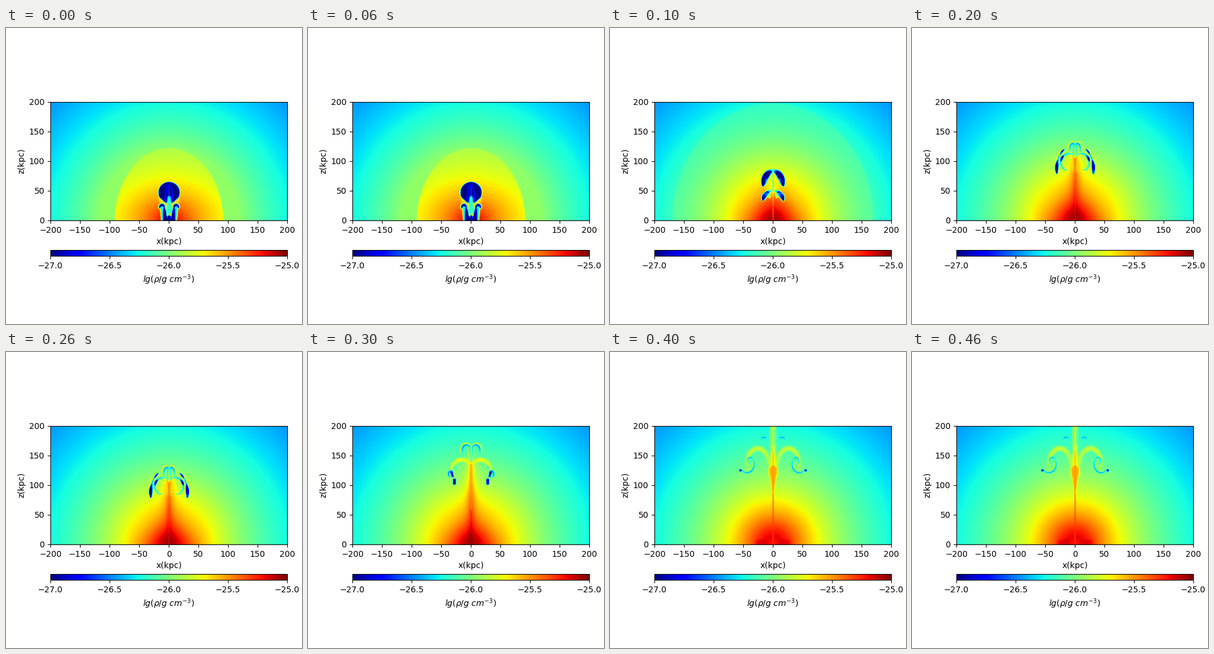
Animation of 500x500 px, one loop 0.5 s. Source, as a matplotlib script:

```python
import numpy as np
import matplotlib.pyplot as plt
from matplotlib.animation import FuncAnimation

LOW, HIGH = -27.0, -25.0
CYAN, BLUE, YELLOW = -26.25, -26.5, -25.73

# Right half of the domain; the left half is its mirror image.
x, z = np.meshgrid(np.arange(200) + 0.5, np.arange(200) + 0.5)
r = np.hypot(x, z)
t = np.linspace(0, 1, 70)


def beta_model(q, centre, slope, core):
    """Log density of gas falling off beyond a core radius."""
    return centre - slope * np.log10(1 + (q / core) ** 2)


def halo():
    return beta_model(r, -25.06, 0.67, 26)


def cool_flanks(f):
    """Thin the gas between the axis and the midplane."""
    f -= 0.07 * np.exp(-((r - 45) / 25) ** 2) * 2 * x * z / r ** 2


def plume(f, top, gain, width):
    """Lift dense gas along the axis up to a given height."""
    rise = np.clip(z / 80, 0, 1) * np.clip((top - z) / 25, 0, 1)
    f += gain * rise * np.exp(-x / width)


def stamp(f, level, px, pz, w, soft):
    """Blend a soft-edged trail of half-width w into the field."""
    gap = np.full(x.shape, 1e3)
    for a, b, half in zip(px, pz, w):
        np.minimum(gap, np.hypot(x - a, z - b) - half, out=gap)
    f += np.clip(0.5 - gap / soft, 0, 1) * (level - f)


def line(f, level, z0, z1, w0, w1=None, x0=0, x1=None, soft=2):
    w1 = w0 if w1 is None else w1
    x1 = x0 if x1 is None else x1
    stamp(f, level, x0 + (x1 - x0) * t, z0 + (z1 - z0) * t,
          w0 + (w1 - w0) * t, soft)


def curl(f, level, centre, radii, start, end, w, soft=2):
    """Elliptic arc between two angles, thinning towards its ends."""
    angle = np.radians(start + (end - start) * t)
    stamp(f, level, centre[0] + radii[0] * np.cos(angle),
          centre[1] + radii[1] * np.sin(angle),
          w * (0.4 + 0.6 * np.sin(np.pi * t)), soft)


def crown(f, centre, rx, rz, w):
    """Rolled-up cap: a thin arc inside a denser rim."""
    curl(f, YELLOW, centre, (rx + 3, rz + 3), 130, -20, w, soft=3)
    curl(f, BLUE, centre, (rx, rz), 130, -20, w)


def bubble():
    inner = beta_model(np.hypot(x, 1.3 * z), -25.12, 0.37, 15)
    outer = np.minimum(halo(), -25.95)
    f = np.where(np.hypot(x / 91, z / 122) < 1, inner, outer)
    line(f, LOW, 47, 47, 18)
    curl(f, -25.65, (0, 47), (20, 20), -65, -30, 3, soft=3)
    line(f, -26.15, 16, 38, 6, 3, soft=4)
    line(f, BLUE, 34, 60, 0.6, x0=7, x1=3)
    # feet and base column
    line(f, CYAN, 0, 24, 3, x0=10, x1=12, soft=3)
    curl(f, CYAN, (12, 21), (4, 5), 180, 0, 3, soft=3)
    curl(f, LOW, (12, 21), (4, 5), 180, 0, 1.8)
    line(f, LOW, 0, 19, 4, 1.8, x0=6, x1=8)
    line(f, LOW, 0, 6, 3)
    line(f, CYAN, 9, 60, 0.9, 0.4)
    return f


def twin_lobes():
    s = np.hypot(x / 169, z / 198)
    f = halo() + np.where(s < 1, 0.06 * s ** 4, 0)
    cool_flanks(f)
    line(f, -25.7, 0, 47, 0.3)
    line(f, YELLOW, 55, 78, 10, soft=14)
    line(f, CYAN, 48, 87, 0.7)
    # upper pair, then lower pair
    curl(f, CYAN, (0, 57), (15, 27), 10, 85, 5.5)
    curl(f, LOW, (0, 57), (17, 26), 5, 75, 5)
    curl(f, CYAN, (8, 67), (4, 5), 60, -70, 0.8)
    curl(f, CYAN, (3, 34), (11, 16), 10, 85, 3.5)
    curl(f, LOW, (2, 34), (15, 15), 0, 65, 3.4)
    for size in (3, 6):
        curl(f, CYAN, (11, 40), (size, size), 200, 20, 0.9)
    return f


def mushroom():
    f = halo()
    cool_flanks(f)
    plume(f, 130, 0.4, 7)
    line(f, -25.65, 92, 104, 9, 6, soft=10)
    line(f, -25.45, 70, 106, 1, 2, soft=4)
    line(f, -25.4, 0, 105, 0.3)
    # outer rim and its heavy tip
    rim = (8, 86), (23, 38)
    curl(f, YELLOW, *rim, 65, -10, 4, soft=4)
    curl(f, BLUE, *rim, 65, -10, 1.2)
    curl(f, LOW, *rim, 62, 45, 1.2)
    curl(f, LOW, *rim, 22, -9, 2.8)
    # inner curls
    curl(f, BLUE, (10, 98), (14, 15), 110, -60, 1.1)
    curl(f, LOW, (10, 98), (14, 15), 45, 10, 1.9)
    curl(f, CYAN, (14, 90), (6, 5), 0, -110, 0.8)
    curl(f, CYAN, (18, 115), (7, 7), 120, 230, 0.8)
    crown(f, (4, 120), 5, 10, 1.2)
    line(f, BLUE, 109, 130, 0.7, x0=3)
    line(f, CYAN, 106, 133, 0.6)
    return f


def detached_cap():
    f = halo()
    cool_flanks(f)
    plume(f, 155, 0.42, 6.5)
    curl(f, YELLOW, (16, 122), (18, 21), 160, 15, 3, soft=4)
    line(f, -25.55, 60, 138, 0.4, 2.5, soft=4)
    line(f, YELLOW, 138, 165, 2, 1, x0=1, x1=4, soft=4)
    # side remnants
    curl(f, CYAN, (27, 127), (3, 4), 190, 20, 0.8)
    curl(f, BLUE, (33, 119), (5, 6), 80, -60, 1.4)
    line(f, LOW, 115, 122, 1.5, 2, x0=31, x1=33)
    line(f, LOW, 103, 109, 2.3, x0=28)
    crown(f, (8, 159), 7, 9, 1.2)
    line(f, BLUE, 140, 166, 0.4, 0.8, x0=1, x1=3)
    line(f, YELLOW, 142, 168, 0.4)
    return f


def spreading_curls():
    f = halo() - 0.16 * np.exp(-(r / 14) ** 2)
    line(f, -25.14, 3, 3, 3, x0=15, x1=25, soft=10)
    # axial jet
    line(f, YELLOW, 120, 168, 8, 2, soft=5)
    line(f, -25.55, 84, 126, 0.5, 7, soft=3)
    line(f, -25.3, 0, 84, 0.8)
    line(f, -25.45, 84, 160, 0.6)
    # arch and its curls
    curl(f, -25.83, (26, 137), (18, 25), 180, -10, 4, soft=5)
    curl(f, -25.85, (44, 136), (9, 10), -50, -200, 1, soft=3)
    curl(f, BLUE, (44, 135), (12, 14), -40, -210, 1)
    curl(f, BLUE, (38, 141), (5, 6), -40, 140, 0.9)
    line(f, LOW, 125, 125, 1.8, x0=55)
    # top
    line(f, -25.85, 162, 197, 4, 5, soft=4)
    line(f, CYAN, 168, 196, 0.4, x0=2.5)
    line(f, YELLOW, 160, 199, 0.5)
    curl(f, BLUE, (15, 176), (5, 5), 130, 30, 0.8)
    curl(f, CYAN, (7, 192), (4, 5), 70, -60, 0.7)
    return f


stages = [bubble, twin_lobes, mushroom, detached_cap, spreading_curls]
fields = [np.hstack([f[:, ::-1], f]) for f in (stage() for stage in stages)]

fig = plt.figure(figsize=(5, 5), dpi=100)
ax = fig.add_axes([0.15, 0.15, 0.8, 0.8])
image = ax.imshow(fields[0], cmap="jet", vmin=LOW, vmax=HIGH, origin="lower",
                  extent=(-200, 200, 0, 200))
ax.set_xticks(range(-200, 201, 50))
ax.set_yticks(range(0, 201, 50))
ax.set_xlabel("x(kpc)")
ax.set_ylabel("z(kpc)")

bar_ax = fig.add_axes([0.15, 0.23, 0.8, 0.02])
bar = fig.colorbar(image, cax=bar_ax, orientation="horizontal",
                   ticks=np.linspace(LOW, HIGH, 5))
bar.set_label(r"$lg(\rho/g\ cm^{-3})$")


def update(i):
    image.set_data(fields[i])
    return [image]


anim = FuncAnimation(fig, update, frames=len(fields), interval=100,
                     repeat=True, repeat_delay=0)
plt.show()
```
